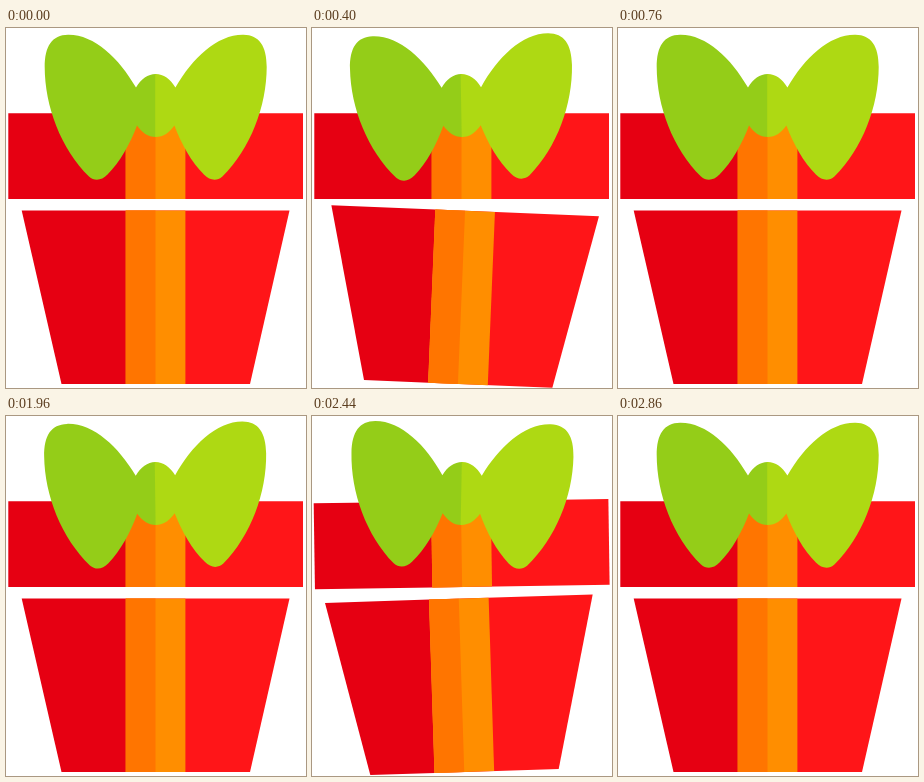
An HTML page that plays this animation: 300 px wide and 360 px high, repeating every 6260 ms.

```html
<!DOCTYPE html>
<html lang="en">
<head>
<meta charset="utf-8">
<title>Gift box</title>
<style>
  html, body { margin: 0; width: 100%; height: 100%; overflow: hidden; background: #fff; }
  svg { display: block; width: 100%; height: 100%; }
  .dark { fill: #e60012; }
  .red { fill: #ff1518; }
  .amber { fill: #ff7500; }
  .orange { fill: #ff8e00; }
</style>
</head>
<body>
<svg viewBox="0 0 300 360">
  <defs>
    <path id="wing" d="M130 59.5C113 30 88 6.3 62 6.7C46 7 38.700 18 38.700 39
      C38.700 78 55 121 83 148.500C88.500 153.300 95.500 152.700 101.500 146.500
      C114 134 124 116 131 97.500C136 104.500 142 109 149.700 109H150.200V46H149.700C142 46 135 51 130 59.500Z"/>
  </defs>
  <g id="base">
    <path class="red" d="M120 182.600H283.500L244 356H120Z"/>
    <path class="dark" d="M15.700 182.600H120V356H55.500Z"/>
    <path class="orange" d="M119.700 182.600H179.400V356H119.700Z"/>
    <path class="amber" d="M119.700 182.600H149.500V356H119.700Z"/>
  </g>
  <g id="lid">
    <path class="red" d="M120 85.200H297V171H120Z"/>
    <path class="dark" d="M2.300 85.200H120V171H2.300Z"/>
    <path class="orange" d="M119.700 85.200H179.400V171H119.700Z"/>
    <path class="amber" d="M119.700 85.200H149.500V171H119.700Z"/>
  </g>
  <g id="bow">
    <use href="#wing" fill="#94cd18"/>
    <use href="#wing" fill="#aed913" transform="translate(299.400) scale(-1 1)"/>
  </g>
</svg>
<script>
const LOOP = 6260, STEP = 60, START = 160, MID_X = 149.6;

// One full swing to one side and back through the other, at rest before and after.
function swing(t, start, length, degrees) {
  const p = (t - start) / length;
  return p > 0 && p < 1 ? degrees * Math.sin(2 * Math.PI * p) : 0;
}

// The box rattles twice: all together, then rippling down from bow to base.
const angles = {
  bow: t => swing(t, 130, 430, 1.4) + swing(t, 1935, 540, -2.7),
  lid: t => swing(t, 100, 600, -2.4) + swing(t, 1960, 520, 1.8),
  base: t => swing(t, 265, 485, 2.4) + swing(t, 2230, 600, -2.25)
};
const centres = { bow: 79.5, lid: 128, base: 269.2 };

function draw(ms) {
  const t = ms % LOOP;
  const held = t < START ? 0 : START + Math.floor((t - START) / STEP) * STEP;
  for (const id in angles) {
    const turn = angles[id](held).toFixed(3);
    document.getElementById(id).setAttribute('transform', `rotate(${turn} ${MID_X} ${centres[id]})`);
  }
}

const begin = performance.now();
function tick() {
  draw(performance.now() - begin);
  requestAnimationFrame(tick);
}
tick();
</script>
</body>
</html>
```
